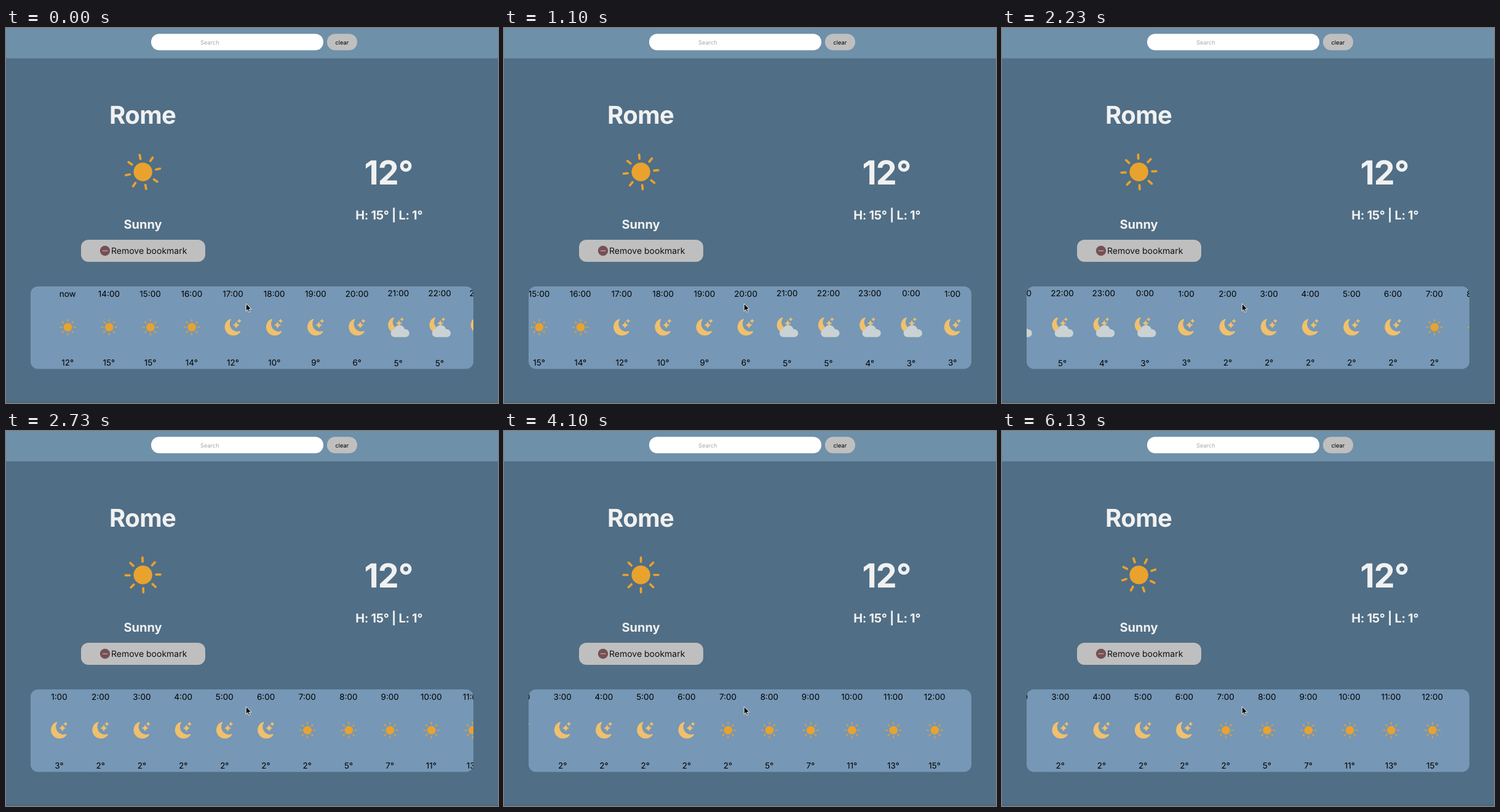
These frames come from a looping animation (800x611 px, 6170 ms). An HTML page:

```html
<!DOCTYPE html>
<html lang="en">
<head>
<meta charset="utf-8">
<title>Weather</title>
<style>
  html, body { margin: 0; width: 100%; height: 100%; overflow: hidden; background: #506e85; }
  svg { display: block; width: 800px; height: 611px; font-family: Inter, "Open Sans", sans-serif; text-rendering: geometricPrecision; }
  .mid { text-anchor: middle; }
  .head { fill: #f1f1f1; font-weight: 700; text-anchor: middle; }
  #strip text { font-size: 13.5px; text-anchor: middle; }
  .sun { fill: #e9a22e; stroke: #e9a22e; }
</style>
</head>
<body>
<svg viewBox="0 0 800 611">
  <defs>
    <linearGradient id="shade" x2="0" y2="1">
      <stop offset="0" stop-opacity="0"/>
      <stop offset="1" stop-opacity=".07"/>
    </linearGradient>
    <clipPath id="card"><rect x="40" y="421" width="720" height="134.5" rx="12"/></clipPath>
    <g id="sun" class="sun"><circle r="15.2" stroke="none"/></g>
    <path id="star" d="M0-1Q.2-.2 1 0 .2.2 0 1-.2.2-1 0-.2-.2 0-1z" stroke-width=".12"/>
    <g id="moon" fill="#f0c06d" stroke="#f0c06d" stroke-linejoin="round">
      <path d="M5.5.5A7.8 7.8 0 1 0 14.6 12.3 7.9 7.9 0 0 1 5.5.5z"/>
      <use href="#star" transform="translate(11 6) scale(2.95)"/>
      <use href="#star" transform="translate(14 2) scale(1.95)"/>
    </g>
    <g id="cloud" fill="#cad2d3">
      <circle cx="-5.7" cy="497" r="6.6"/>
      <circle cx="1.8" cy="493" r="9"/>
      <circle cx="11.6" cy="497.2" r="6.4"/>
      <rect x="-5.7" y="494" width="17.3" height="9.6"/>
    </g>
  </defs>

  <rect width="800" height="611" fill="#506e85"/>
  <rect y="606" width="800" height="5" fill="url(#shade)"/>
  <rect width="800" height="49.5" fill="#6e90a9"/>
  <rect x="236" y="9.5" width="280" height="26.7" rx="13" fill="#fff"/>
  <text x="316" y="26.5" font-size="9.3" fill="#a9a9a9">Search</text>
  <rect x="522" y="9.5" width="49" height="26.7" rx="13" fill="#bfbfbf"/>
  <text class="mid" x="546.3" y="26.5" font-size="9.3">clear</text>

  <text class="head" x="222.2" y="156" font-size="40" letter-spacing="-.6">Rome</text>
  <use id="bigSun" href="#sun"/>
  <text class="head" x="222.5" y="327" font-size="20">Sunny</text>
  <text class="head" x="622" y="255" font-size="54" letter-spacing="-1">12°</text>
  <text class="head" x="622.7" y="312" font-size="20" letter-spacing="-.35">H: 15° | L: 1°</text>

  <rect x="122" y="345" width="202" height="36" rx="12" fill="#bfbfbf"/>
  <circle cx="161" cy="363" r="8.2" fill="#765055"/>
  <path d="M156.8 363h8.4" stroke="#c9b3b5" stroke-width="1.2"/>
  <text x="171" y="368" font-size="14" fill="#111">Remove bookmark</text>

  <rect x="40" y="421" width="720" height="134.5" rx="12" fill="#7697b5"/>
  <g clip-path="url(#card)"><g id="strip"></g></g>
  <path d="M390.3 449v12.4l2.8-2.7 1.9 4.4 2-.9-1.9-4.2h3.9z" stroke="#fff" stroke-width=".9"/>
</svg>
<script>
const LOOP = 6170, STEP = 67.22, SPIN = 20000, SPIN_START = 15600;
const temps = [12, 15, 15, 14, 12, 10, 9, 6, 5, 5, 4, 3, 3, 2, 2, 2, 2, 2, 2, 5, 7, 11, 13, 15];
// time, scroll offset, velocity
const scrollKeys = [
  [0, 0, .06], [770, 101.7, .2], [1470, 291.7, .36], [2730, 820, .4],
  [3330, 905, 0], [3500, 905, 0], [3630, 928, .085], [4270, 946.5, 0]
];
const byId = id => document.getElementById(id);

let rays = '';
for (let a = 0; a < 360; a += 45)
  rays += `<path d="M0-21.6V-28.3" stroke-width="3.7" stroke-linecap="round" transform="rotate(${a})"/>`;
byId('sun').innerHTML += rays;

function icon(i) {
  if (i < 4 || i > 17) return '<use href="#sun" transform="translate(.3 487.5) scale(.45)"/>';
  if (i > 7 && i < 12)
    return '<use href="#moon" transform="translate(-16.5 471.5) scale(1.6)"/><use href="#cloud"/>';
  return '<use href="#moon" transform="translate(-13.2 474) scale(1.68)"/>';
}

byId('strip').innerHTML = temps.map((deg, i) => {
  const label = i ? (13 + i) % 24 + ':00' : 'now';
  const dy = i > 7 && i < 12 ? .7 : 0;
  return `<g transform="translate(${100.2 + i * STEP})">
    <text y="${438 - dy}">${label}</text>${icon(i)}<text y="${549.8 + dy}">${deg}°</text></g>`;
}).join('');

function scrollAt(t) {
  const k = scrollKeys.findIndex(key => key[0] > t);
  if (k < 0) return scrollKeys.at(-1)[1];
  const [t0, p0, v0] = scrollKeys[k - 1], [t1, p1, v1] = scrollKeys[k];
  const d = t1 - t0, u = (t - t0) / d, w = 1 - u;
  return p0 * w * w * (1 + 2 * u) + p1 * u * u * (3 - 2 * u) + d * u * w * (v0 * w - v1 * u);
}

const bezier = (a, b, u) => 3 * a * u * (1 - u) ** 2 + 3 * b * u * u * (1 - u) + u ** 3;

// CSS "ease" timing curve
function ease(x) {
  let lo = 0, hi = 1;
  for (let i = 0; i < 24; i++) {
    const m = (lo + hi) / 2;
    if (bezier(.25, .25, m) < x) lo = m; else hi = m;
  }
  return bezier(.1, 1, lo);
}

function draw() {
  const t = performance.now() % LOOP;
  const turn = 360 * ease((SPIN_START + t) % SPIN / SPIN);
  byId('bigSun').setAttribute('transform', `translate(222.6 234.5) rotate(${turn})`);
  byId('strip').setAttribute('transform', `translate(${-scrollAt(t)})`);
  requestAnimationFrame(draw);
}
draw();
</script>
</body>
</html>
```
